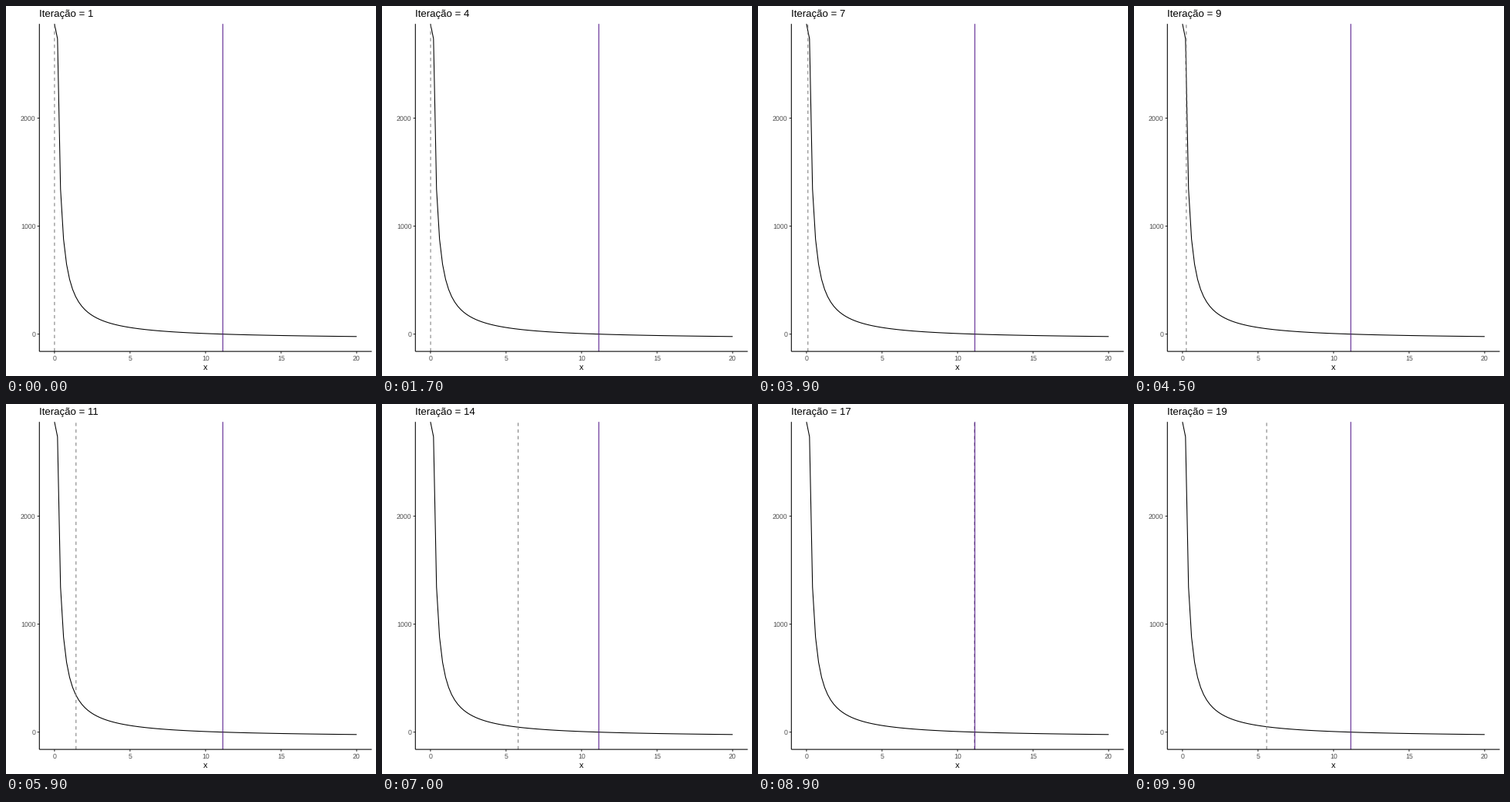
Write a matplotlib script that moves like this. It is 480 px wide and 480 px high and loops after 10 s.

```python
import numpy as np
import matplotlib.pyplot as plt
from matplotlib.animation import FuncAnimation

plt.rcParams["font.family"] = "Liberation Sans"
plt.rcParams["text.hinting"] = "none"

SIZE, DPI = 480, 72          # at 72 dpi one point is one pixel
FRAMES, INTERVAL = 100, 100
LEFT, RIGHT, TOP, BOTTOM = 43.3, 474.5, 23.2, 448.1
LW = 1.07

TOTAL, N = 557, 50           # score function: TOTAL / x - N
ROOT = TOTAL / N


def score(x):
    return TOTAL / x - N


# Newton iterations towards the root
steps = [0.001]
while len(steps) < 19:
    x = steps[-1]
    steps.append(x * (2 - x / ROOT))

# First frame of every iteration; the last entry closes the loop
starts = [0, 3, 11, 17, 23, 29] + list(range(35, 91, 5)) + [94, FRAMES]

y_min, y_max = score(20), score(0.2)
pad = 0.05 * (y_max - y_min)


def px(x):
    return LEFT + (x + 1) * (RIGHT - LEFT) / 22


def py(y):
    return BOTTOM - (y - y_min + pad) * (BOTTOM - TOP) / (y_max - y_min + 2 * pad)


def state(frame):
    """Iteration number and position of the estimate."""
    i = max(k for k in range(19) if starts[k] <= frame)
    moves = 2 if i == 5 else 1
    t = max(0, frame - (starts[i + 1] - moves) + 1) / (moves + 1)
    a, b = steps[i], steps[(i + 1) % 19]
    number = i + 1 if t <= 0.5 else i + 2
    return number, a + (b - a) * t


fig = plt.figure(figsize=(SIZE / DPI, SIZE / DPI), dpi=DPI, facecolor="white")
ax = fig.add_axes([0, 0, 1, 1])
ax.set_xlim(0, SIZE)
ax.set_ylim(SIZE, 0)
ax.axis("off")


def line(xs, ys, color="black", **kw):
    return ax.plot(xs, ys, color=color, lw=LW, snap=False,
                   solid_capstyle="butt", **kw)[0]


def label(x, y, text, size, color="black", ha="center"):
    return ax.text(x, y, text, fontsize=size, color=color, ha=ha, va="baseline")


xs = np.linspace(0, 20, 101)[1:]
line(np.r_[px(0), px(xs)], np.r_[TOP, py(score(xs))], solid_joinstyle="round")
guess = line([px(0)] * 2, [BOTTOM, TOP], "#7f7f7f", linestyle=(0, (4, 4)))
line([px(ROOT)] * 2, [BOTTOM, TOP], "#551a8b")

for v in (0, 5, 10, 15, 20):
    line([px(v)] * 2, [BOTTOM, BOTTOM + 2.75], "#333333")
    label(px(v), 460, str(v), 8.8, "#4d4d4d")
for v in (0, 1000, 2000):
    line([LEFT - 2.75, LEFT], [py(v)] * 2, "#333333")
    label(LEFT - 4.95, round(py(v) + 3.2), str(v), 8.8, "#4d4d4d", "right")
line([LEFT, RIGHT], [BOTTOM] * 2)
line([LEFT] * 2, [BOTTOM, TOP])
label((LEFT + RIGHT) / 2, 472, "x", 11)
title = label(LEFT, 14, "", 13.2, ha="left")


def draw(frame):
    number, x = state(frame)
    title.set_text(f"Iteração = {number}")
    guess.set_xdata([px(x)] * 2)
    return title, guess


anim = FuncAnimation(fig, draw, frames=FRAMES, interval=INTERVAL,
                     repeat=True, repeat_delay=0)
plt.show()
```
